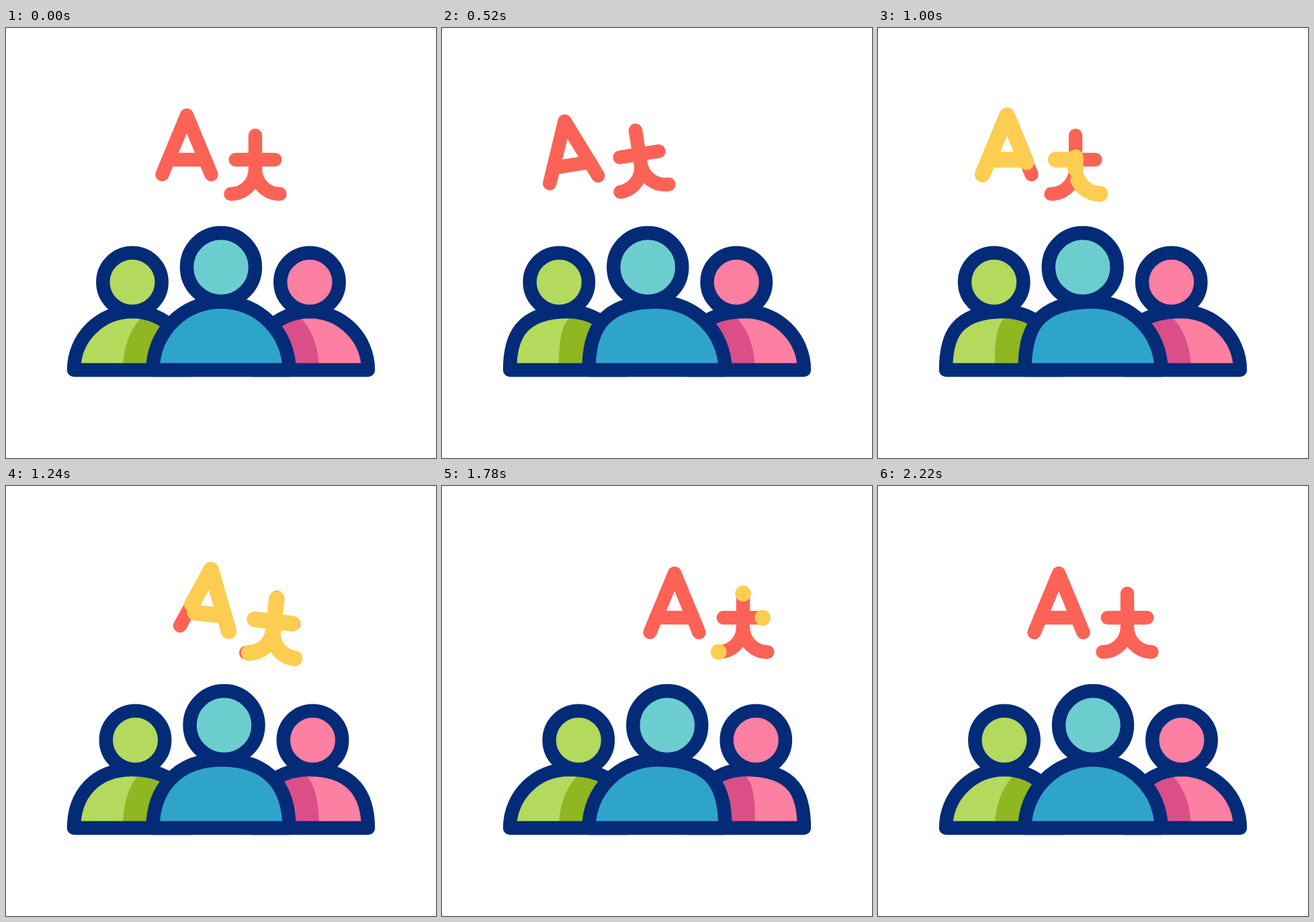
Animation, 640 px wide and 640 px high, one loop 2400 ms. Source, as an HTML page with a canvas:

```html
<!DOCTYPE html>
<html lang="en">
<head>
<meta charset="utf-8">
<title>People and languages</title>
<style>
  html, body { margin: 0; width: 100%; height: 100%; overflow: hidden; background: #fff; }
  canvas { display: block; width: 640px; height: 640px; }
</style>
</head>
<body>
<canvas id="stage"></canvas>
<script>
const LOOP = 2400, STEP = 20, SIZE = 640, LINE = 20.4, GLOW = 23.4, BASE = 509;
const NAVY = '#032b78', RED = '#fc6356', YELLOW = '#fecd51';

const canvas = document.getElementById('stage');
const ctx = canvas.getContext('2d');
const ratio = window.devicePixelRatio || 1;
canvas.width = canvas.height = SIZE * ratio;

// Tracks are [time, value] pairs, eased between neighbours.
const tracks = {
  leanLeft: [[200, 0], [600, 1], [1000, 1], [1400, 0]],
  leanRight: [[1000, 0], [1400, 1], [1800, 1], [2200, 0]],
  slide: [[200, 0], [600, -87], [1000, -77], [1400, 87], [1800, 77], [2200, 0]],
  tilt: [[200, 0], [600, -10], [1000, 0], [1400, 10], [1800, 0]]
};

const ease = x => x * x * (3 - 2 * x);

function valueAt(track, t) {
  if (t <= track[0][0]) return track[0][1];
  for (let i = 1; i < track.length; i++) {
    const [t0, v0] = track[i - 1], [t1, v1] = track[i];
    if (t < t1) return v0 + (v1 - v0) * ease((t - t0) / (t1 - t0));
  }
  return track[track.length - 1][1];
}

function stroke(path, color, width) {
  ctx.strokeStyle = color;
  ctx.lineWidth = width;
  ctx.stroke(path);
}

// Dome whose shoulders swell on the side it leans to.
function dome(cx, r, left, right) {
  const k = 0.552, swell = 0.31, top = BASE - r;
  const path = new Path2D();
  path.moveTo(cx - r, BASE);
  path.bezierCurveTo(cx - r, BASE - k * r, cx - (k + swell * left) * r, top, cx, top);
  path.bezierCurveTo(cx + (k + swell * right) * r, top, cx + r, BASE - k * r, cx + r, BASE);
  path.closePath();
  return path;
}

// Inner shade; side is 1 when it lies to the right of the middle, -1 for the mirror.
function shade(cx, side, lean) {
  const x = d => cx + side * d;
  const path = new Path2D();
  path.moveTo(x(-14), BASE);
  path.bezierCurveTo(x(-14), 475, x(-2 - 12 * lean), 446, x(15 - 14 * lean), 430);
  path.lineTo(x(30 - 14 * lean), 410);
  path.lineTo(x(100), 410);
  path.lineTo(x(100), BASE);
  path.closePath();
  return path;
}

function person(p, left, right) {
  const body = dome(p.x, p.r, left, right);
  ctx.fillStyle = p.body;
  ctx.fill(body);
  if (p.shade) {
    ctx.save();
    ctx.clip(body);
    ctx.fillStyle = p.shade;
    ctx.fill(shade(p.x, p.side, p.side > 0 ? left : right));
    ctx.restore();
  }
  stroke(body, NAVY, LINE);

  const head = new Path2D();
  head.arc(p.x + 15.3 * (right - left), p.headY, p.headR, 0, 2 * Math.PI);
  ctx.fillStyle = p.head;
  ctx.fill(head);
  stroke(head, NAVY, LINE);
}

const people = [
  { x: 188, r: 87, headY: 378.3, headR: 43.7, body: '#b3d95d', head: '#b3d95d', shade: '#90b622', side: 1 },
  { x: 452, r: 87, headY: 378.3, headR: 43.7, body: '#fd7fa1', head: '#fd7fa1', shade: '#da4f88', side: -1 },
  { x: 320, r: 101.5, headY: 356, headR: 51, body: '#2fa4cb', head: '#6ccdcf' }
];

// Each stroke runs in the direction in which the highlight travels.
const glyphs = [
  { from: 600, strokes: [
    { path: new Path2D('M232.5 218L269 130L305.5 218'), length: 190.5 },
    { path: new Path2D('M241.6 196H296.4'), length: 54.8 }
  ] },
  { from: 800, strokes: [
    { path: new Path2D('M371 210V160'), length: 50 },
    { path: new Path2D('M341.7 196H400.3'), length: 58.6 },
    { path: new Path2D('M407.5 247A36.5 37 0 0 1 371 210A36.5 37 0 0 1 334.5 247'), length: 115.4 }
  ] }
];

function letters(t) {
  ctx.save();
  ctx.translate(320 + valueAt(tracks.slide, t), 188.6);
  ctx.rotate(valueAt(tracks.tilt, t) * Math.PI / 180);
  ctx.translate(-320, -188.6);
  for (const g of glyphs) for (const s of g.strokes) stroke(s.path, RED, LINE);
  for (const g of glyphs) {
    const end = valueAt([[g.from, 0], [g.from + 500, 1]], t);
    const start = valueAt([[g.from + 500, 0], [g.from + 1000, 1]], t);
    if (end <= start) continue;
    for (const s of g.strokes) {
      ctx.setLineDash([s.length * (end - start), 1000]);
      ctx.lineDashOffset = -s.length * start;
      stroke(s.path, YELLOW, GLOW);
    }
    ctx.setLineDash([]);
  }
  ctx.restore();
}

function draw() {
  const t = Math.floor((performance.now() % LOOP) / STEP) * STEP;
  ctx.setTransform(ratio, 0, 0, ratio, 0, 0);
  ctx.fillStyle = '#fff';
  ctx.fillRect(0, 0, SIZE, SIZE);
  ctx.lineCap = ctx.lineJoin = 'round';
  const left = valueAt(tracks.leanLeft, t), right = valueAt(tracks.leanRight, t);
  for (const p of people) person(p, left, right);
  letters(t);
  requestAnimationFrame(draw);
}
draw();
</script>
</body>
</html>
```
